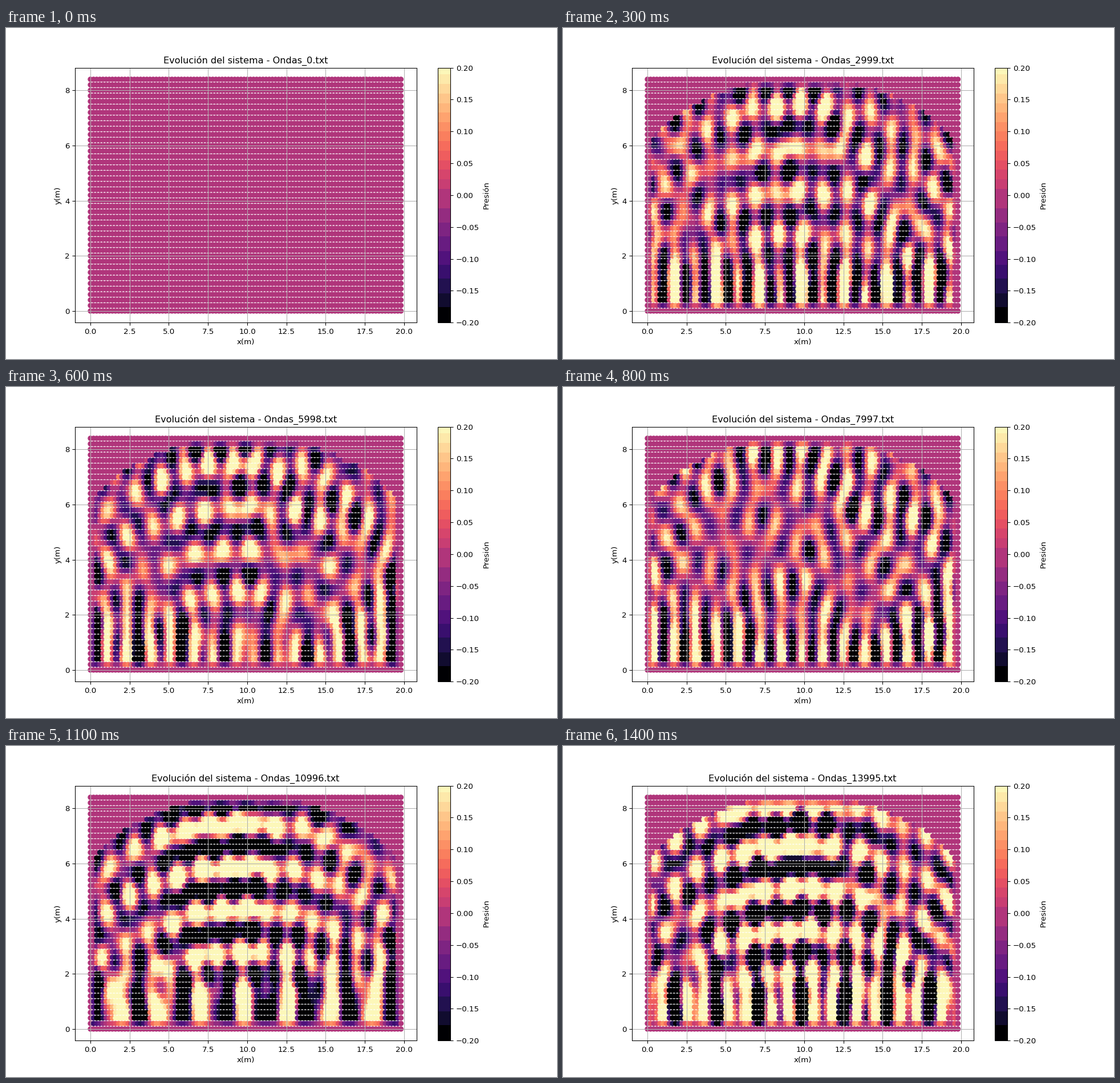
A matplotlib script for the animation above (1500 ms loop, 966x580 px).

```python
import numpy as np
import matplotlib.pyplot as plt
from matplotlib.animation import FuncAnimation
from matplotlib.colors import ListedColormap

FRAMES = 15
LIMIT = 0.2
CYCLES_PER_FRAME = 0.22
WALL = 0.43          # x of the left wall's antinode
FLOOR = 0.3
STRIPE = 1.35        # horizontal wavelength of the floor stripes
ARCH = 1.56          # spacing of the crests that follow the vault

x, y = np.meshgrid(np.arange(100) * 0.2, np.arange(43) * 0.2, indexing="ij")
vault = 4.1 + 4.3 * np.sqrt(1 - ((x - 9.9) / 11) ** 2)


def inside(gap):
    """Cells at least `gap` away from the floor, side walls and ceiling."""
    return ((x > gap) & (x < 19.8 - gap) & (y > gap) & (y < 8.4 - gap)
            & (y < vault + 0.03))


# The cells along the walls move only a little
room = 0.75 * inside(0.3) + 0.25 * inside(0.1)


def ripple(distance, wavelength):
    return np.cos(2 * np.pi * distance / wavelength)


def scattered(count=16, wavenumber=4.3, amp=0.07):
    """Standing waves of one wavelength in random directions and phases."""
    rng = np.random.default_rng(7)
    total = np.zeros(x.shape, complex)
    for _ in range(count):
        angle = rng.uniform(-1.1, 1.1)
        shift, phase = rng.uniform(0, 2 * np.pi, 2)
        kx, ky = wavenumber * np.cos(angle), wavenumber * np.sin(angle)
        total += amp * np.exp(1j * phase) * np.cos(kx * x + shift) * np.cos(ky * (y - FLOOR))
    return total * (1 - 0.6 * np.exp(-(y / 1.6) ** 2))


def amplitude():
    """Complex amplitude of the pressure in every cell."""
    side = ((x - 9.9) / 9.5) ** 2
    height = y - FLOOR

    stripes = 0.36 * ripple(x - WALL, STRIPE) * np.exp(-(height / (1.3 + 2.3 * side)) ** 2)
    lobes = -0.36 * ripple(x - WALL, 2 * STRIPE) * np.exp(-(height / 1.7) ** 2)
    arches = (0.36 * ripple(vault - y - 0.96, ARCH) * (1 - np.exp(-(height / 2) ** 2))
              * (0.35 + 0.65 * np.exp(-((x - 8.8) / 3.4) ** 2)))

    lead = np.exp(1j * np.radians(59))
    return room * (stripes + lead * (lobes + arches) + scattered())


FIELD = amplitude().ravel()


def pressure(i):
    gain = (1 - np.exp(-i)) * (1 + i / 40)
    turn = np.exp(2j * np.pi * CYCLES_PER_FRAME * (i - 3))
    return gain * (turn * FIELD).real


def banded_magma():
    """Magma in flat bands, wider in the dark half."""
    inner = np.concatenate([np.linspace(-0.176, -0.021, 8), np.arange(0.01, 0.195, 0.015)])
    edges = np.concatenate([[-LIMIT], inner, [LIMIT]])
    mids = (edges[:-1] + edges[1:]) / 2
    colors = plt.get_cmap("magma")((mids + LIMIT) / (2 * LIMIT))
    colors[0] = (0, 0, 0.01, 1)
    levels = np.linspace(-LIMIT, LIMIT, 512)
    return ListedColormap(colors[np.digitize(levels, inner)])


plt.rcParams["font.family"] = "DejaVu Sans"
fig, ax = plt.subplots(figsize=(10, 6.004141), dpi=96.6)  # 966 x 580 pixels
dots = ax.scatter(x.ravel(), y.ravel(), c=pressure(0), cmap=banded_magma(),
                  vmin=-LIMIT, vmax=LIMIT)
fig.colorbar(dots, ax=ax, label="Presión")
ax.set_xlabel("x(m)")
ax.set_ylabel("y(m)")
ax.grid(True)
title = ax.set_title("")


def update(i):
    dots.set_array(pressure(i))
    title.set_text(f"Evolución del sistema - Ondas_{2999 * i // 3}.txt")
    return dots, title


anim = FuncAnimation(fig, update, frames=FRAMES, interval=100, repeat=True,
                     repeat_delay=0, blit=False)
plt.show()
```
